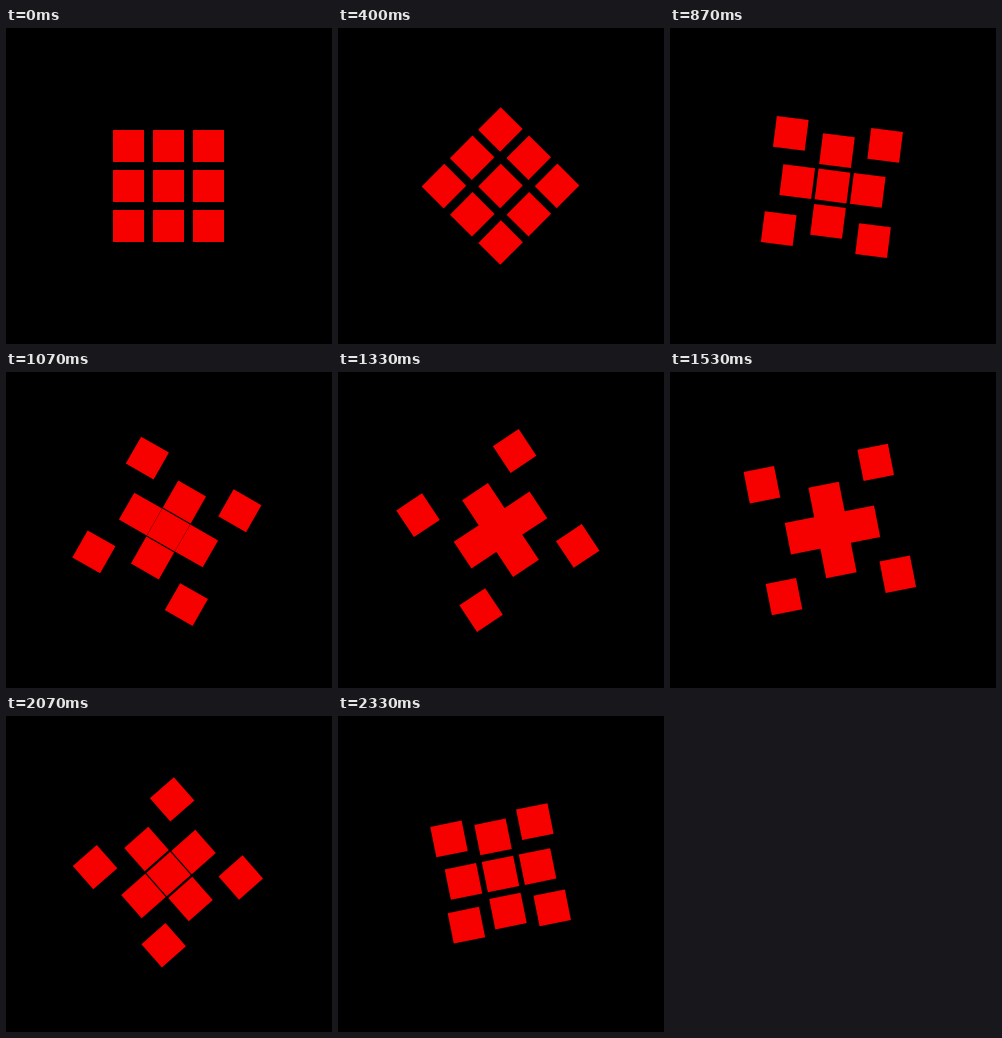
An HTML page with a canvas for the animation above (2.39 s loop, 326 by 316 pixels).

```html
<!DOCTYPE html>
<html lang="en">
<head>
<meta charset="utf-8">
<title>Rotating squares</title>
<style>
  html, body { margin: 0; width: 100%; height: 100%; overflow: hidden; background: #000; }
  canvas { display: block; }
</style>
</head>
<body>
<canvas id="stage" width="326" height="316"></canvas>
<script>
  const ctx = document.getElementById('stage').getContext('2d');
  const LOOP = 2390, STEP = 1000 / 15;
  const CELL_W = 31, CELL_H = 32, PITCH = 40;

  const ramp = (x, from, to) => Math.min(1, Math.max(0, (x - from) / (to - from)));
  const mix = (a, b, t) => a + (b - a) * t;

  // Corners fly out slightly off-centre while the edge cells close into a cross.
  function cellCenter(col, row, spread) {
    const corner = col && row;
    const openX = corner ? 58 * col + 2.5 : 30 * col;
    const openY = corner ? 57 * row + 1 : 30 * row;
    return [mix(PITCH * col, openX, spread), mix(PITCH * row, openY, spread)];
  }

  function draw(time) {
    const step = Math.floor((time % LOOP + 5) / STEP);
    const spread = ramp(step, 9, 18) - ramp(step, 28, 37);
    // Steady turn that slows briefly as the corners reach their furthest point.
    const degrees = 7.48 * step - 3.2 * ramp(step, 16, 20);

    ctx.resetTransform();
    ctx.fillStyle = '#000';
    ctx.fillRect(0, 0, 326, 316);
    ctx.translate(162.5, 158);
    ctx.rotate(degrees * Math.PI / 180);
    ctx.fillStyle = '#f70000';
    for (let row = -1; row <= 1; row++) {
      for (let col = -1; col <= 1; col++) {
        const [x, y] = cellCenter(col, row, spread);
        ctx.fillRect(x - CELL_W / 2, y - CELL_H / 2, CELL_W, CELL_H);
      }
    }
  }

  const start = performance.now();
  function tick() {
    draw(performance.now() - start);
    requestAnimationFrame(tick);
  }
  tick();
</script>
</body>
</html>
```
